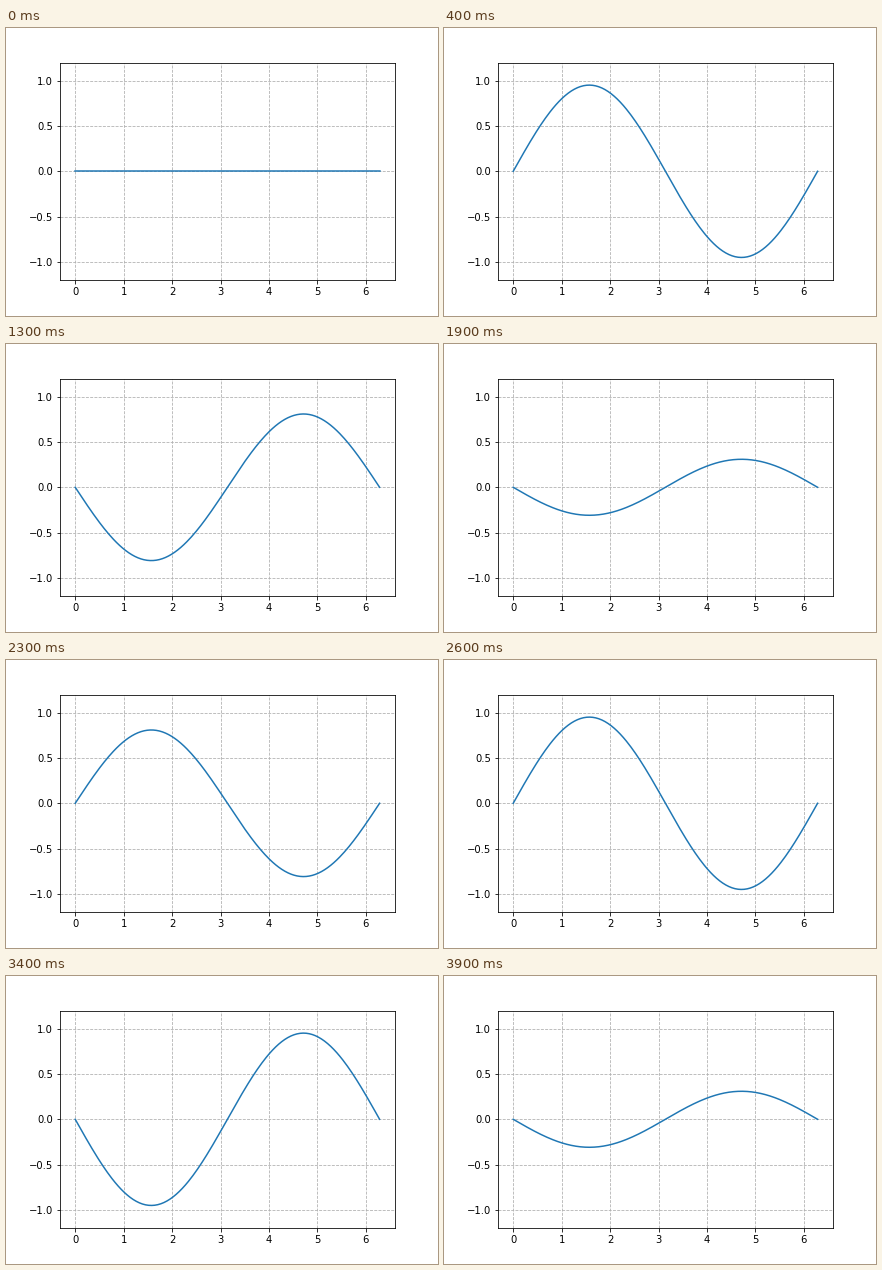
A matplotlib script for the animation above (4000 ms loop, 432 px wide and 288 px high).

```python
import matplotlib.pyplot as plt
import numpy as np
from matplotlib.animation import FuncAnimation

INTERVAL = 100   # ms per frame
FRAMES = 40
PERIOD = 20      # frames per oscillation

plt.rcParams.update({"font.family": "DejaVu Sans", "font.size": 10})

fig, ax = plt.subplots(figsize=(6, 4), dpi=72, facecolor="white")
fig.subplots_adjust(left=0.125, right=0.9, bottom=0.125, top=0.88)

x = np.linspace(0, 2 * np.pi, 200)
wave = np.sin(x)
margin = 0.05 * 2 * np.pi

ax.set_xlim(-margin, 2 * np.pi + margin)
ax.set_ylim(-1.2, 1.2)
ax.set_xticks(range(7))
ax.set_yticks(np.arange(-2, 3) * 0.5)
ax.grid(linestyle="--")

line, = ax.plot(x, 0 * wave, color="#1f77b4", linewidth=1.5)


def update(frame):
    """Standing wave: a fixed sine shape with an oscillating amplitude."""
    line.set_ydata(np.sin(2 * np.pi * frame / PERIOD) * wave)
    return line,


anim = FuncAnimation(fig, update, frames=FRAMES, interval=INTERVAL,
                     repeat=True, repeat_delay=0)
plt.show()
```
